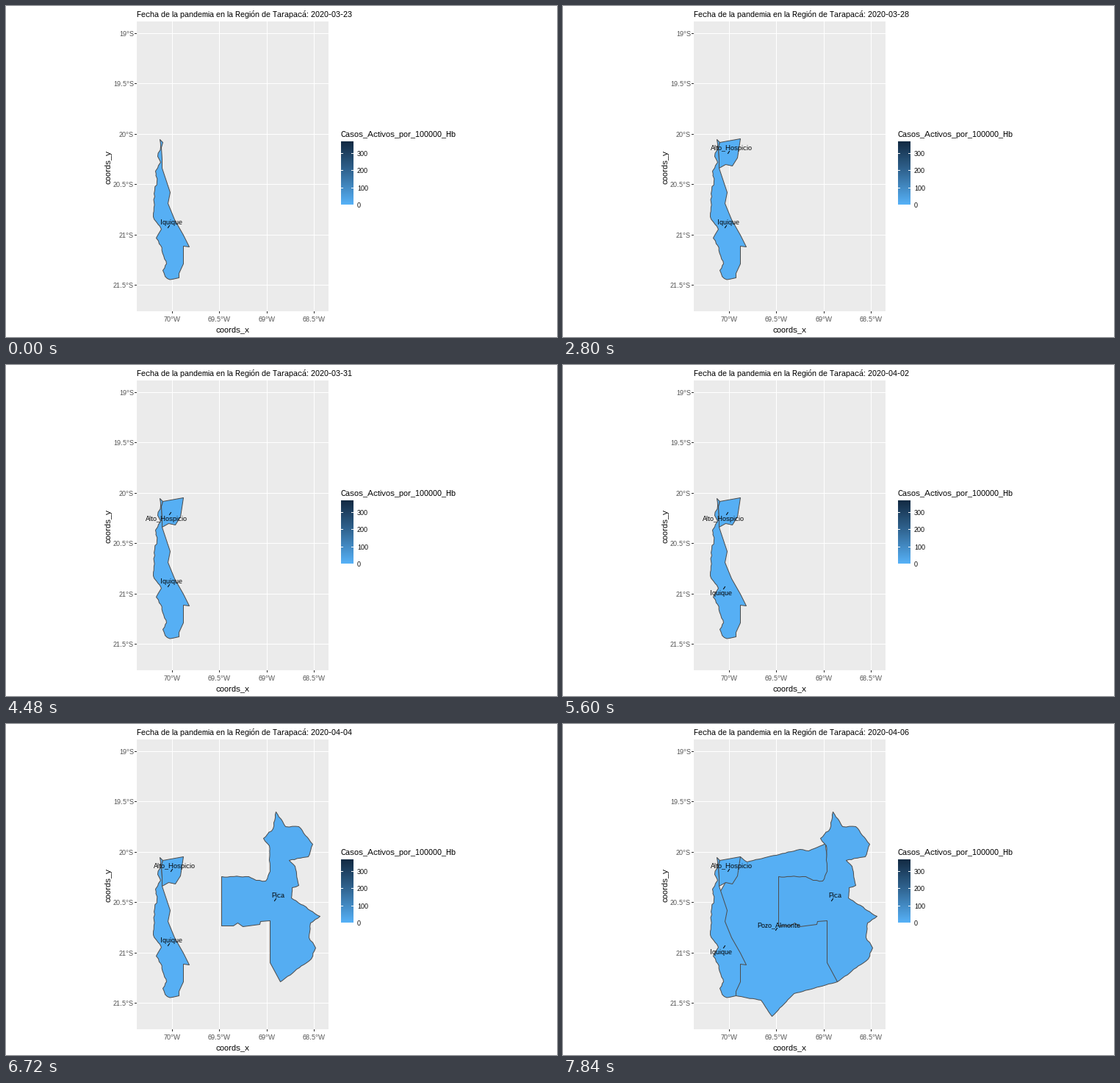
A matplotlib script that plays this animation: 750x450 px, repeating every 8000 ms.

```python
import math

import matplotlib.pyplot as plt
import numpy as np
from matplotlib.animation import FuncAnimation
from matplotlib.colors import LinearSegmentedColormap
from matplotlib.patches import Polygon, Rectangle

plt.rcParams.update({
    "font.family": ["Liberation Sans", "DejaVu Sans"],
    "text.hinting": "native",
    "text.hinting_factor": 1,
    "text.kerning_factor": 6,
})

W, H, DPI = 750, 450, 72
STEP = 80            # ms per frame
FRAMES_PER_DAY = 7   # each day stays 560 ms
FRAMES = 100

LOW, MID, HIGH = "#56B1F7", "#336A98", "#132B43"
GREY = "#4D4D4D"

fig = plt.figure(figsize=(W / DPI, H / DPI), dpi=DPI, facecolor="white")
ax = fig.add_axes([0, 0, 1, 1])
ax.axis("off")


def line(x0, y0, x1, y1, color, z=1):
    """One pixel wide line that covers both end pixels."""
    return ax.plot([x0 + .5, x1 + .5], [y0 + .5, y1 + .5], color=color, lw=1,
                   solid_capstyle="projecting", snap=False, zorder=z)[0]


def text(x, y, s, size=9, color="black", ha="left", va="baseline", **kw):
    return ax.text(x, y, s, fontsize=size, color=color, ha=ha, va=va,
                   zorder=6, **kw)


def rough(points, amp, seed=1):
    """Break a polyline into short pieces and jitter the new points."""
    rng = np.random.default_rng(seed)
    out = []
    for (x0, y0), (x1, y1) in zip(points, points[1:]):
        n = max(1, round(math.hypot(x1 - x0, y1 - y0) / 4))
        for i in range(n):
            dx, dy = rng.uniform(-amp, amp, 2) if i else (0, 0)
            out.append((x0 + (x1 - x0) * i / n + dx,
                        y0 + (y1 - y0) * i / n + dy))
    return out + [points[-1]]


def draw_panel():
    ax.add_patch(Rectangle((178, 21), 261, 394, color="#EBEBEB", lw=0, zorder=0))
    for i in range(6):
        y = round(37 + 68.45 * i)
        line(178, y, 438, y, "white")
        line(175, y, 177, y, "#333333")
        text(174, y + 4, f"{19 + i / 2:g}°S", color=GREY, ha="right")
    for i in range(4):
        x = round(226 + 64.3 * i)
        line(x, 21, x, 414, "white")
        line(x, 415, x, 417, "#333333")
        text(x + .5, 429, f"{70 - i / 2:g}°W", color=GREY, ha="center")
    text(308.5, 443, "coords_x", 11, ha="center")
    text(139, 218.5, "coords_y", 11, ha="center", va="center", rotation=90)


def draw_legend():
    text(455, 178, "Casos_Activos_por_100000_Hb", 11)
    cmap = LinearSegmentedColormap.from_list("cases", [HIGH, MID, LOW])
    ax.imshow(np.linspace(0, 1, 86)[:, None], cmap=cmap, aspect="auto",
              extent=(456, 473, 270, 184), interpolation="nearest", zorder=2)
    for value in (0, 100, 200, 300):
        y = round(270 - value * 0.2345)
        if value:
            line(456, y, 458, y, "white", 3)
            line(470, y, 472, y, "white", 3)
        text(478, y + 4, str(value))


def outlines():
    """Borders of the four communes, from key points."""
    strip = [(213, 185), (211, 192), (212, 208), (212, 220)]
    inland = [(219, 241), (223, 253), (220, 268), (229, 290), (241, 311),
              (249, 327), (241, 326), (241, 350), (235, 363), (235, 369)]
    coast = [(226, 371), (219, 370), (213, 359), (218, 350), (210, 325),
             (204, 315), (211, 303), (200, 286), (202, 250), (205, 238),
             (203, 224), (210, 212), (206, 204), (210, 191), (209, 181)]
    plateau = [(221, 215), (230, 217), (237, 206), (241, 180)]

    north = [(293, 207), (330, 207), (340, 212), (353, 213), (359, 200),
             (358, 165), (350, 155), (363, 142), (367, 119), (380, 139),
             (398, 139), (407, 151), (417, 163), (411, 180), (385, 185),
             (393, 193), (398, 219), (389, 222), (388, 236), (427, 261),
             (414, 270), (412, 290), (421, 304), (415, 319), (373, 350)]
    south = [(359, 324), (359, 267), (346, 268), (345, 272), (322, 275),
             (315, 270), (309, 274), (293, 274)]

    # Lies below its neighbours, so only the outer edge matters
    pampa = [(241, 180), (250, 187), (322, 170), (334, 172), (357, 162),
             (373, 350), (314, 366), (284, 397), (269, 375), (235, 369),
             (212, 230)]
    return (strip + inland + rough(coast, 1.1), strip + plateau,
            rough(north, .7) + south, rough(pampa, .4))


class Commune:
    """Filled shape with a name and a short pointer at its anchor."""

    def __init__(self, name, outline, color, z, anchor, start, below=()):
        self.start, self.below, self.anchor = start, below, anchor
        shape = Polygon(np.array(outline) + .5, closed=True, facecolor=color,
                        edgecolor=GREY, lw=1, joinstyle="round", zorder=z)
        ax.add_patch(shape)
        self.name = text(0, 0, name, ha="center")
        self.pointer = line(0, 0, 0, 0, "black", 5)
        self.artists = shape, self.name, self.pointer

    def update(self, day):
        for artist in self.artists:
            artist.set_visible(day >= self.start)
        x, y = self.anchor
        side = -1 if day in self.below else 1
        self.name.set_position((x + 5.25 * side, y + 4 - 8 * side))
        self.pointer.set_data([x + .5, x + .5 + 2 * side],
                              [y + .5, y + .5 - 3 * side])


draw_panel()
draw_legend()
title = text(178, 15, "", 11)

iquique, hospicio, pica, pozo = outlines()
communes = [
    Commune("Iquique", iquique, "#56AFF4", 4, (220, 301), 0, {2, 6, 7, 10, 14}),
    Commune("Alto_Hospicio", hospicio, "#56AFF4", 4, (224, 200), 2,
            {3, 6, 8, 10, 13}),
    Commune("Pica", pica, "#55ADF2", 4, (365, 240), 12),
    Commune("Pozo_Almonte", pozo, "#56AFF4", 3, (289, 280), 13),
]
ax.set_xlim(0, W)
ax.set_ylim(H, 0)


def date(day):
    return f"2020-03-{23 + day}" if day < 9 else f"2020-04-{day - 8:02d}"


def update(frame):
    day = frame // FRAMES_PER_DAY
    title.set_text(f"Fecha de la pandemia en la Región de Tarapacá: {date(day)}")
    for commune in communes:
        commune.update(day)
    return []


anim = FuncAnimation(fig, update, frames=FRAMES, interval=STEP,
                     init_func=lambda: update(0), repeat=True, repeat_delay=0)
plt.show()
```
